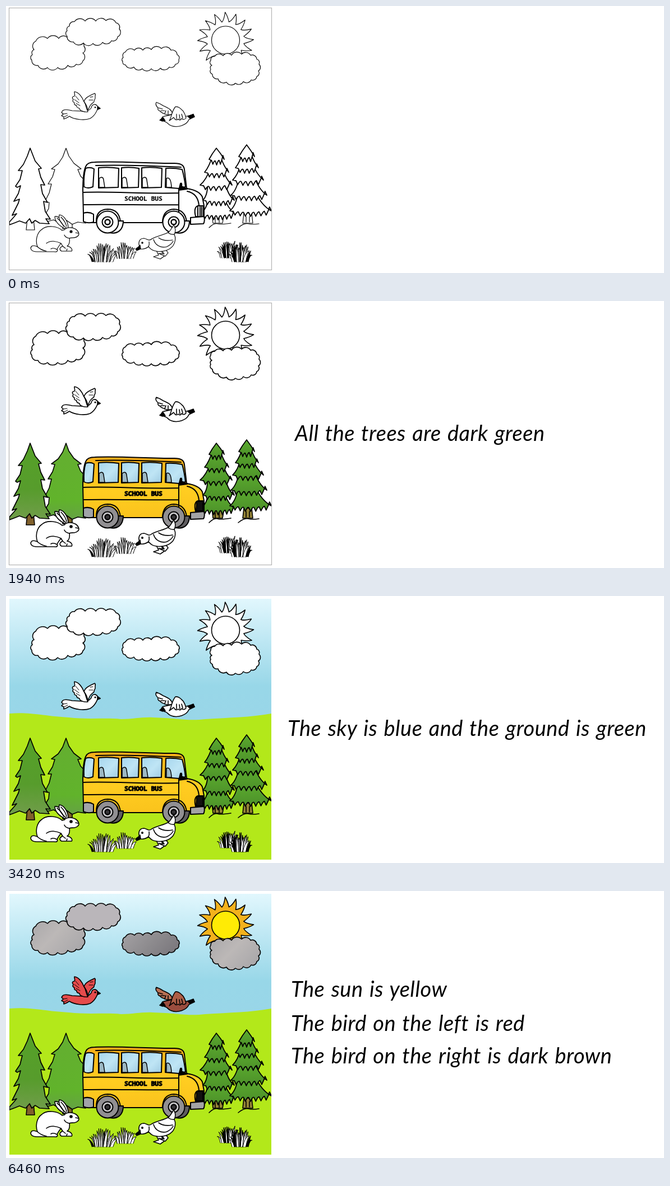
Animation, 1173 px wide and 477 px high, one loop 8000 ms. Source, as an HTML page:

```html
<!DOCTYPE html>
<html lang="en">
<head>
<meta charset="utf-8">
<title>Colour the scene</title>
<style>
html, body { margin: 0; width: 100%; height: 100%; overflow: hidden; background: #fff; }
svg { display: block; width: 1173px; height: 477px; }
#art { fill: none; stroke: #000; stroke-linejoin: round; stroke-linecap: round; animation: bold 8s step-end infinite; }
@keyframes bold { 0% { stroke-width: 1.15px; } 5.75% { stroke-width: 1.6px; } }
.bus { stroke-width: 2px; }
.fine { stroke-width: 1px; }
.ink { fill: #000; }
.say { font: italic 38px Lato, "Open Sans", sans-serif; letter-spacing: .5px; word-spacing: 2px; fill: #000; }
.sign { font: bold 11.3px "Noto Sans Mono", monospace; fill: #000; stroke: #000; animation: sign 8s step-end infinite; }
@keyframes sign { 0% { stroke-width: .2px; } 5.75% { stroke-width: 1.1px; } }
</style>
</head>
<body>
<svg id="stage" viewBox="0 0 1173 477" xmlns="http://www.w3.org/2000/svg"></svg>
<script>
const cuts = [0, 460, 1940, 3420, 4900, 6460, 8000].map(t => t / 80);

// paintN colours a shape at step N; showN/hideN/onlyN switch whole parts
let css = "";
for (let n = 1; n < 6; n++) {
  const a = cuts[n], b = cuts[n + 1];
  css += `@keyframes paint${n}{0%{fill:#fff}${a}%{fill:var(--c)}}
@keyframes show${n}{0%{opacity:0}${a}%{opacity:1}}
@keyframes hide${n}{0%{opacity:1}${a}%,100%{opacity:0}}
@keyframes only${n}{0%{opacity:0}${a}%{opacity:1}${b}%{opacity:${n === 5 ? 1 : 0}}}\n`;
  for (const k of ["paint", "show", "hide", "only"])
    css += `.${k}${n}{animation:${k}${n} 8s step-end infinite}\n`;
}
document.head.appendChild(document.createElement("style")).textContent = css;

const line = (d, cls = "") => `<path d="${d}" class="${cls}"/>`;
const area = (d, n, c, extra = "") => `<path d="${d}" class="paint${n}" style="--c:${c};${extra}"/>`;
const white = d => `<path d="${d}" fill="#fff"/>`;
const poly = s => "M" + s.trim().split(/\s+/).join("L") + "Z";
const ring = (x, y, r) => `M${x - r},${y}a${r},${r} 0 1 1 ${2 * r},0a${r},${r} 0 1 1 ${-2 * r},0Z`;
const grad = (id, stops, x2 = 0, y2 = 1) => `<linearGradient id="${id}" x1="0" y1="0" x2="${x2}" y2="${y2}">` +
  stops.map(([o, c]) => `<stop offset="${o}" stop-color="${c}"/>`).join("") + "</linearGradient>";

let seed = 11;
const rnd = () => (seed = (seed * 16807) % 2147483647) / 2147483647;

// outward arcs between notch points
function cloud(s, c) {
  const p = s.split(" ").map(q => q.split(",").map(Number));
  const d = p.map((q, i) => {
    const [x, y] = p[(i + 1) % p.length];
    const r = (Math.hypot(x - q[0], y - q[1]) * .62).toFixed(1);
    return `A${r},${r} 0 0 1 ${x},${y}`;
  }).join("");
  return area(`M${p[0]}${d}Z`, 4, c);
}

function sun(x, y) {
  const at = (deg, r) => {
    const a = deg * Math.PI / 180;
    return (x + Math.sin(a) * r).toFixed(1) + "," + (y - Math.cos(a) * r).toFixed(1);
  };
  let d = "M" + at(-11, 33);
  for (let i = 0; i < 16; i++) {
    const a = i * 22.5 - 1;
    d += `Q${at(a - 3, 37)} ${at(a, 50)}Q${at(a + 6, 43)} ${at(a + 11.5, 33)}`;
  }
  return area(d + "Z", 5, "#f3b21c") + area(ring(x, y, 25), 5, "#ffeb05");
}

// tiers run [lower edge, left reach, right reach] from the top down
function fir(x, top, tiers) {
  let out = "";
  for (let i = tiers.length - 1; i >= 0; i--) {
    const [y, l, r] = tiers[i], n = 4 + i;
    const up = i ? tiers[i - 1][0] - 8 : top;
    const neck = i ? tiers[i - 1][1] * .55 : 0;
    let d = `M${x - neck},${up}Q${x - l * .6},${y - 12} ${x - l},${y - 2}`;
    for (let k = 1; k <= n; k++) {
      const px = x - l + (l + r) * k / n, w = (l + r) / n;
      const low = y + (k === n ? -2 : 4 + 4 * Math.sin(Math.PI * k / n));
      d += `Q${px - w * .6},${y - 1} ${px - w * .35},${low - 7}L${px},${low}`;
    }
    d += `Q${x + r * .6},${y - 12} ${x + neck},${up}Z`;
    out += area(d, 2, "url(#fir)", "stroke-width:1.8px");
  }
  return out;
}

function grass(x, y, w, h, n, dark) {
  let out = "";
  for (let i = 0; i < n; i++) {
    const u = (i + .5) / n * 2 - 1, b = x + u * w * .28 + rnd() * 4 - 2;
    const tx = x + u * w / 2, ty = y - h * (1 - .62 * u * u) * (.7 + .3 * rnd());
    const m = b + u * w * .08, my = y - h * .55 * (1 - .3 * u * u), t = 1.6 + rnd();
    const d = `M${b - t},${y}Q${m - t},${my} ${tx},${ty}Q${m + t},${my + 2} ${b + t},${y}`;
    out += `<path d="${d}" class="fine" fill="${rnd() < dark ? "#000" : "#fff"}"/>`;
  }
  return out;
}

const defs = "<defs>" +
  grad("sky", [[0, "#e1f7fd"], [.35, "#bde7f3"], [.72, "#98d7e8"], [1, "#99d6e8"]]) +
  grad("pine", [[0, "#55a128"], [.6, "#579c2c"], [1, "#719d4b"]]) +
  grad("leaf", [[0, "#64ae31"], [.75, "#61b32b"], [1, "#65a244"]]) +
  grad("fir", [[0, "#5cac2f"], [1, "#4c9029"]]) +
  grad("paint", [[0, "#f7ac1a"], [.2, "#f9bc1c"], [.55, "#ffcd21"], [1, "#fac31c"]]) +
  grad("glass", [[0, "#a6d6ee"], [.55, "#bfe5f5"], [1, "#9fcbe2"]], 1, 1) +
  grad("ash", [[0, "#a9a7a9"], [.5, "#bcb8b7"], [1, "#aba9ab"]], 1, .6) +
  grad("slate", [[0, "#a5a2a5"], [.6, "#8d8b8e"], [1, "#7e7b80"]], 1, .4) + "</defs>";

const frame = `<rect x="5.5" y="3.5" width="468" height="468" fill="#fff" stroke="#b3b3b3" stroke-width="1.2" class="hide3"/>`;
const land = `<g class="show3" stroke="none"><rect x="6" y="5" width="467" height="217" fill="url(#sky)"/>
<path fill="#b3e81a" d="M6,210C45,207 70,215 112,217C145,221 180,217 205,220C228,220 240,216 262,217C305,218 325,224 355,220C400,217 435,217 473,210V471H6Z"/></g>`;

const clouds =
  cloud("50,78 53,63 74,58 94,58 110,57 128,62 139,72 137,84 137,98 125,104 110,106 92,110 74,110 57,106 46,97 47,87", "url(#ash)") +
  cloud("113,36 122,28 141,27 160,27 178,26 196,30 202,41 199,55 188,62 172,65 155,67 138,66 120,64 109,54 109,44", "#bab6ba") +
  cloud("209,92 213,82 229,79 244,79 259,78 277,76 294,79 305,87 308,96 302,104 291,109 275,111 259,112 243,112 228,109 213,105 208,99", "url(#slate)");
const low = cloud("367,106 365,97 372,90 387,89 402,88 420,86 436,88 447,95 451,104 450,116 447,126 437,132 423,135 409,138 393,136 378,130 368,122 365,113", "url(#ash)");

const red = "#e54b4c";
const birds =
  area("M139,171C141,163 150,160 158,156C161,158 158,161 159,163C160,167 156,168 157,171C155,174 152,174 150,178L146,186C144,178 142,174 139,171Z", 5, red) +
  area("M168,183L163,179C160,174 153,175 152,182C148,187 143,190 136,188L118,187C110,185 104,184 101,187L99,190L102,193L99,196L103,198L103,202L108,200L113,197C122,203 140,205 150,201C160,195 161,188 163,185Z", 5, red) +
  area("M146,189C142,182 143,176 139,171C136,163 130,154 122,153C121,155 124,158 122,161C118,162 117,164 120,167C118,170 119,171 122,173C121,176 123,177 126,178C125,181 128,182 131,183C131,187 139,190 146,189Z", 5, red) +
  line("M124,161L130,168M122,167L130,173M125,174L132,178M102,193L109,192M104,198L110,195M150,163L155,162M148,168L155,168", "fine") +
  line(ring(159, 181, .8), "ink") + line("M163,180L168,183L163,185Z", "ink") +
  area("M297,193C295,184 288,182 280,178C276,175 271,173 268,172C266,175 268,179 271,182C270,185 272,187 275,188C276,191 280,191 283,193C288,195 292,195 297,193Z", 5, "#b97155") +
  area("M276,203L279,198C287,195 292,196 297,193C308,193 316,197 322,197L333,194L336,198L326,203C322,213 306,218 295,214C288,212 289,208 284,207Z", 5, "#9b4d3e") +
  area("M291,205C295,200 295,188 302,180C308,179 312,184 316,188C318,191 320,196 321,200C318,204 316,203 313,201C311,205 309,204 307,202C303,206 300,201 299,199Z", 5, "#ad5e46") +
  line("M272,182L279,184M276,187L283,187M283,192L285,187M289,193L289,187M304,202L304,193M310,202L309,194M315,200L313,193") +
  line("M274,204L280,199L284,205L279,206ZM324,197L334,193L336,198L328,201Z", "ink");

const trees =
  area("M101,380H118V398H101Z", 2, "#7b6429") +
  area(poly(`107,254 112,268 121,281 134,291 128,292 133,304 142,313 142,388 128,386 118,390 108,383 95,388 85,382 70,386
    66,378 74,374 70,372 76,362 77,351 68,349 71,346 77,334 81,318 75,318 83,305 87,292 81,291 93,282 101,270`), 2, "url(#leaf)") +
  area("M38,380L36,400H51L49,380Z", 2, "#80602b") +
  area(poly(`43,254 52,277 63,290 58,291 62,306 69,320 62,319 65,335 74,351 67,349 70,367 79,381 71,380 77,389 60,388 52,383
    46,388 42,380 35,388 24,384 14,388 6,391 6,386 14,377 19,371 11,374 15,366 22,352 24,345 14,349 22,335
    26,321 20,324 17,322 25,310 29,294 22,294 31,283 38,268`), 2, "url(#pine)", "stroke-width:1.7px") +
  area("M367,370L369,388H386L389,370Z", 2, "#958437") + area("M424,370L422,388H440L438,370Z", 2, "#958437") +
  line("M362,396Q371,387 377,389T401,388M414,396Q425,387 432,389T451,389M373,378V387M380,376V387M428,376V386M434,376V386") +
  fir(375, 254, [[276, 13, 14], [299, 21, 22], [322, 29, 28], [349, 24, 32], [374, 28, 34]]) +
  fir(429, 248, [[271, 14, 14], [291, 20, 21], [313, 25, 30], [340, 28, 36], [368, 30, 44]]);

const body = "M138,372L137,330C137,310 138,296 142,287C144,281 149,279 158,279C200,277 250,281 300,281C313,281 317,285 318,292L322,326C336,328 346,333 350,341L353,357V381L330,387H150Z";
const win = (x, w) => area(`M${x},289Q${x + w / 2},287 ${x + w},290L${x + w - 1},324L${x},325Z`, 1, "url(#glass)") +
  area(`M${x + 1},324V308Q${x + 8},303 ${x + 9},311L${x + 11},324Z`, 1, "#9db9c4", "stroke-width:1.5px");
const wheel = (x, y) =>
  area(`M${x + 4},${y + 19}C${x + 18},${y + 22} ${x + 28},${y + 14} ${x + 28},${y - 2}H${x + 10}Z`, 1, "#5f5d60") +
  area(ring(x, y, 19.5), 1, "#918f92") + area(ring(x, y, 9.5), 1, "#c7c5c8") +
  area(ring(x, y, 4.5), 1, "#353336", "stroke-width:2.4px");

const bus = `<g class="bus">` + area(body, 1, "url(#paint)") +
  line("M138,333C190,331 250,336 308,334M138,355C190,354 260,356 308,355M308,327V386M160,285C210,283 270,286 312,288M308,327L323,326", "bus") +
  area("M142,290Q150,287 157,291L155,323Q146,327 139,323Q138,303 142,290Z", 1, "url(#glass)") +
  win(165, 36) + win(206, 31) + win(242, 36) +
  area("M285,290Q300,289 314,292Q318,306 320,323L308,326L284,324Z", 1, "url(#glass)") +
  area("M286,324V308Q294,304 295,324Z", 1, "#9db9c4", "stroke-width:1.5px") +
  line("M309,325L311,317Q314,315 313,322L323,327L308,329Z", "ink") +
  line("M323,331Q342,335 344,356M338,376Q334,360 342,357H352V377Z") +
  line("M342,359V375M346,359V375M349,359V375") +
  `<path class="show1" fill="#111" d="M340,358H351V375H339Z"/>` +
  area("M138,370Q148,367 156,372L156,386Q146,389 138,385Z", 1, "#a1a4a8") +
  area("M329,378L353,376Q355,384 352,389L329,390Z", 1, "#a3a3a5") +
  line("M161,386Q160,364 181,363Q202,363 204,386M279,386Q280,364 299,363Q320,364 322,386") +
  wheel(181, 386) + wheel(299, 386) +
  `<text x="211" y="348" class="sign">SCHOOL BUS</text></g>`;

const rabbit =
  white("M106,398C94,393 87,384 87,376C95,375 104,385 108,397Z") +
  white("M108,397C98,389 93,381 95,373C104,374 111,386 111,397Z") +
  white("M104,400C107,395 117,395 123,398C129,401 132,408 128,411C123,416 117,413 113,415C114,422 112,427 109,429C116,430 119,435 117,438H99C94,435 96,431 101,429L98,424C94,429 92,432 91,435C93,438 90,440 86,439H55C45,439 42,433 46,429C49,427 53,429 56,430C52,419 55,405 64,399C73,391 92,393 100,401Z") +
  line("M91,379Q99,385 103,394M98,377Q106,385 108,394M98,424C90,420 79,418 72,424M56,430Q62,436 72,438M101,429L106,433M124,405L129,406M113,415Q106,414 104,409M108,437L109,434M80,434Q84,431 91,435") +
  line(ring(116, 403, 2), "ink");

const duck =
  white("M268,437L272,445L263,448L275,452L282,447L277,438") + white("M278,437L282,443L272,442L284,447L289,441L286,437") +
  white("M240,434C234,424 237,415 246,415C252,416 254,421 260,416C268,411 282,409 290,404C294,400 297,394 299,391C302,396 303,402 300,408C303,414 302,422 298,428C292,436 280,440 268,438C260,437 258,434 254,430C250,433 246,435 240,434Z") +
  line("M263,417C266,428 277,433 287,430M287,430Q295,426 298,420M272,414Q281,421 297,418M289,405Q294,409 300,408M254,430Q256,426 255,421") +
  line("M239,427L240,434L233,437L231,434Q236,431 239,427Z", "ink") + line(ring(243, 423, 1.2), "ink");

const tufts = grass(172, 457, 56, 36, 17, .15) + grass(212, 451, 44, 31, 13, .1) +
  grass(398, 450, 46, 35, 16, .45) + grass(418, 457, 44, 37, 18, .6);

const say = (n, x, y, t) => `<text x="${x}" y="${y}" class="say only${n}">${t}</text>`;
const words =
  say(1, 510, 250, "The bus is yellow with blue windows") +
  say(2, 515, 250, "All the trees are dark green") +
  say(3, 502, 250, "The sky is blue and the ground is green") +
  say(4, 516, 250, "The clouds are are in dark gray") +
  say(5, 508, 189, "The sun is yellow") +
  say(5, 508, 250, "The bird on the left is red") +
  say(5, 508, 308, "The bird on the right is dark brown");

document.getElementById("stage").innerHTML = defs + frame +
  `<clipPath id="page"><rect x="6" y="5" width="467" height="466"/></clipPath>
  <g id="art" clip-path="url(#page)">` +
  land + clouds + sun(391.5, 61) + low + birds + trees + bus + tufts + rabbit + duck + "</g>" + words;
</script>
</body>
</html>
```
